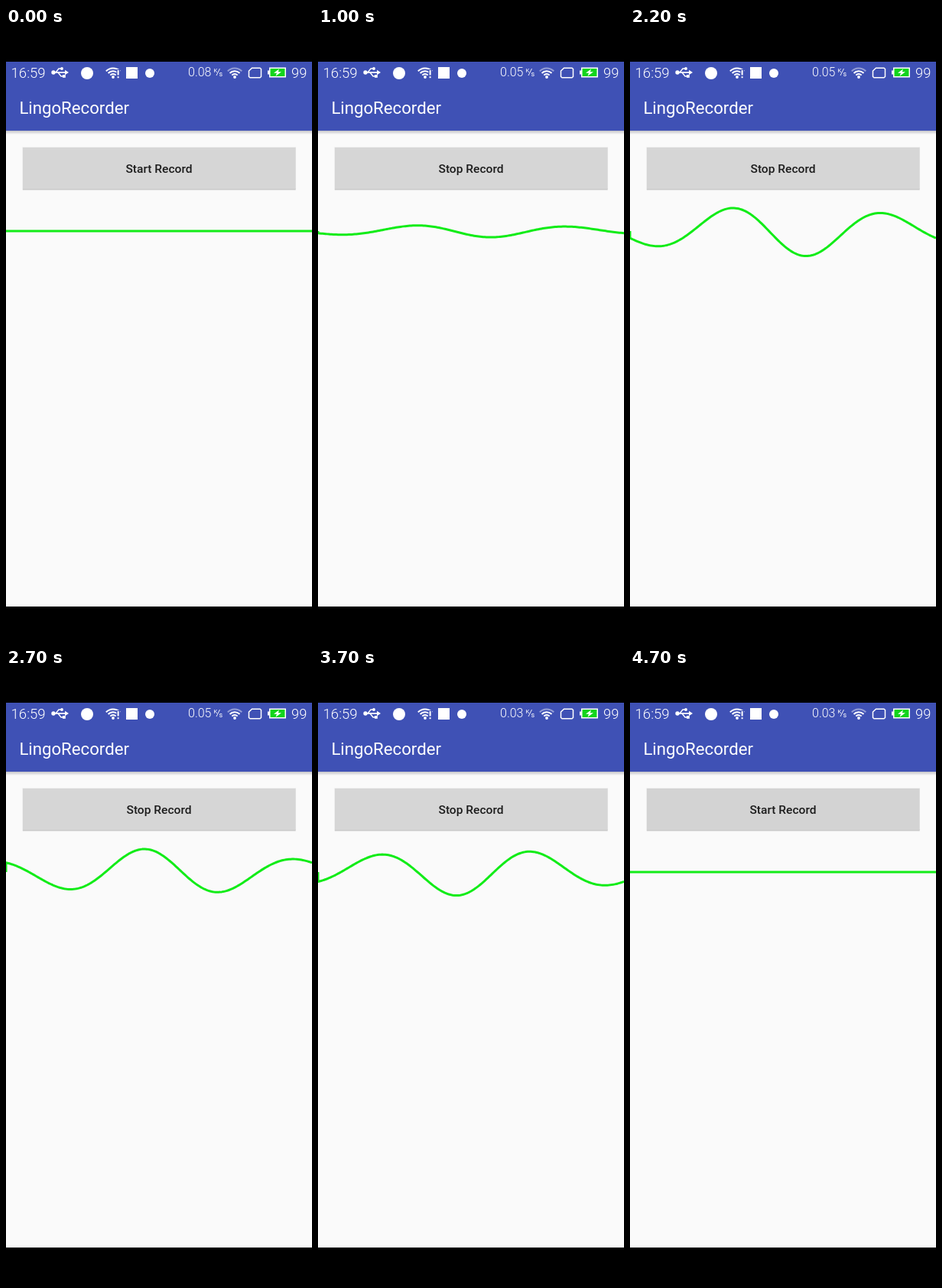
Animation, 400 px wide and 800 px high, one loop 4900 ms. Source, as an HTML page with a canvas:

```html
<!DOCTYPE html>
<html lang="en">
<head>
<meta charset="utf-8">
<title>Recorder</title>
<style>
  html, body { margin: 0; width: 100%; height: 100%; overflow: hidden; background: #000; }
  canvas { display: block; width: 400px; height: 800px; }
</style>
</head>
<body>
<canvas id="stage" width="400" height="800"></canvas>
<script>
const ctx = document.getElementById('stage').getContext('2d');
const W = 400, LOOP = 4900, STEP = 100;
const MID = 265, WAVELENGTH = 200, SPEED = 0.5;
const WAVE_START = 800, WAVE_END = 4500, RECORD_START = 400;

// time, amplitude, trough offset
const KEYS = [
  [800, 4, 127], [1000, 8.2, 127], [1300, 9.2, 130], [1700, 6.8, 134],
  [1900, 35, 133], [2100, 34, 132], [2700, 30.3, 130], [2900, 31.5, 131],
  [3300, 31.2, 133], [4100, 30.5, 127], [4500, 30, 127]
];

function keyed(t) {
  const i = Math.max(1, KEYS.findIndex(k => k[0] >= t));
  const a = KEYS[i - 1], b = KEYS[i];
  const p = (t - a[0]) / (b[0] - a[0]);
  return { amp: a[1] + (b[1] - a[1]) * p, offset: a[2] + (b[2] - a[2]) * p };
}

function rect(x, y, w, h, color) {
  ctx.fillStyle = color;
  ctx.fillRect(x, y, w, h);
}

function text(str, x, y, size, weight, color = '#fff', align = 'left') {
  ctx.font = `${weight} ${size}px Roboto, sans-serif`;
  ctx.textAlign = align;
  ctx.fillStyle = color;
  ctx.fillText(str, x, y);
}

function dot(x, y, r) {
  ctx.fillStyle = '#fff';
  ctx.beginPath();
  ctx.arc(x, y, r, 0, Math.PI * 2);
  ctx.fill();
}

function trace(points, close) {
  ctx.beginPath();
  points.forEach(([x, y]) => ctx.lineTo(x, y));
  if (close) ctx.closePath();
}

function line(points, width, close) {
  ctx.strokeStyle = '#fff';
  ctx.lineWidth = width;
  trace(points, close);
  ctx.stroke();
}

function shape(points, color = '#fff') {
  ctx.fillStyle = color;
  trace(points, true);
  ctx.fill();
}

function wifi(x, y, outerAlpha) {
  ctx.lineWidth = 2;
  [5, 8.8, 12.6].forEach((r, i) => {
    ctx.strokeStyle = `rgba(255,255,255,${i === 2 ? outerAlpha : 1})`;
    ctx.beginPath();
    ctx.arc(x, y, r, -Math.PI * 0.76, -Math.PI * 0.24);
    ctx.stroke();
  });
  dot(x, y - 1, 1.9);
}

function usb() {
  line([[62, 58], [78, 58]], 1.7);
  line([[65, 58], [69, 53], [72, 53]], 1.4);
  line([[68, 58], [72, 63], [75, 63]], 1.4);
  dot(62, 58, 2.7);
  dot(73, 53, 1.9);
  rect(74, 61, 3.8, 3.8, '#fff');
  shape([[77, 54.8], [82, 58], [77, 61.2]]);
}

function battery() {
  rect(342, 55.5, 2, 5, '#fff');
  rect(344, 51.5, 22, 13, '#fff');
  rect(345.5, 53, 19, 10, '#12d41c');
  shape([[357, 53.5], [350, 58.8], [354, 58.8], [352.5, 62.8], [360, 57.2], [355.8, 57.2]]);
}

function statusBar(speed) {
  text('16:59', 6.5, 65, 18.6, 300);
  usb();
  dot(106, 59, 8);
  wifi(140, 65, 1);
  rect(144.3, 54, 5, 13, '#3f51b5');
  rect(145.6, 55, 2, 6.5, '#fff');
  rect(145.6, 63.2, 2, 2, '#fff');
  rect(157, 51, 15, 15, '#fff');
  dot(188, 59, 6);

  text(speed, 238, 63.3, 16, 300);
  text('K', 271.5, 57.5, 7.5, 400);
  line([[275, 62], [279.5, 53]], 0.9);
  text('s', 278.5, 63, 9, 400);
  wifi(299, 65, 0.45);
  line([[321.5, 52.2], [332, 52.2], [333.5, 53.5], [333.5, 63.5], [332, 64.8],
        [319, 64.8], [317.5, 63.5], [317.5, 56]], 1.5, true);
  battery();
  text('99', 373, 65, 18.3, 300);
}

function button(label, color) {
  rect(21.5, 155.5, 357.5, 56, '#e6e6e6');
  rect(22, 209, 356.5, 2.3, '#c9c9c9');
  rect(22, 156, 356.5, 54, color);
  text(label, 200, 189, 15.56, 500, '#1c1c1c', 'center');
}

function wave(t) {
  ctx.strokeStyle = '#12ec18';
  ctx.lineWidth = 3;
  ctx.lineJoin = 'round';
  ctx.beginPath();
  ctx.moveTo(0, MID);
  if (t < WAVE_START || t >= WAVE_END) {
    ctx.lineTo(W, MID);
  } else {
    const { amp, offset } = keyed(t);
    const trough = offset + SPEED * t;
    for (let x = 0; x <= W; x += 2) {
      const u = x / (W / 2) - 1;
      const swing = Math.cos((x - trough) * 2 * Math.PI / WAVELENGTH);
      ctx.lineTo(x, MID + amp * swing / (1 + u * u));
    }
  }
  ctx.stroke();
  ctx.lineJoin = 'miter';
}

function draw(t) {
  const recording = t >= RECORD_START && t < WAVE_END;
  rect(0, 0, W, 800, '#000');
  rect(0, 44, W, 711, '#fafafa');

  const shadow = ctx.createLinearGradient(0, 134, 0, 139);
  shadow.addColorStop(0, '#c4c4c8');
  shadow.addColorStop(1, '#fafafa');
  rect(0, 134, W, 5, shadow);
  rect(0, 44, W, 90, '#3f51b5');

  statusBar(t < 800 ? '0.08' : t < 3200 ? '0.05' : '0.03');
  text('LingoRecorder', 17.4, 112, 22.2, 400);
  button(recording ? 'Stop Record' : 'Start Record', t >= WAVE_END ? '#d3d3d3' : '#d6d6d6');
  wave(t);
}

const start = performance.now();
function tick() {
  const t = (performance.now() - start) % LOOP;
  draw(Math.floor(t / STEP) * STEP);
  requestAnimationFrame(tick);
}
tick();
</script>
</body>
</html>
```
